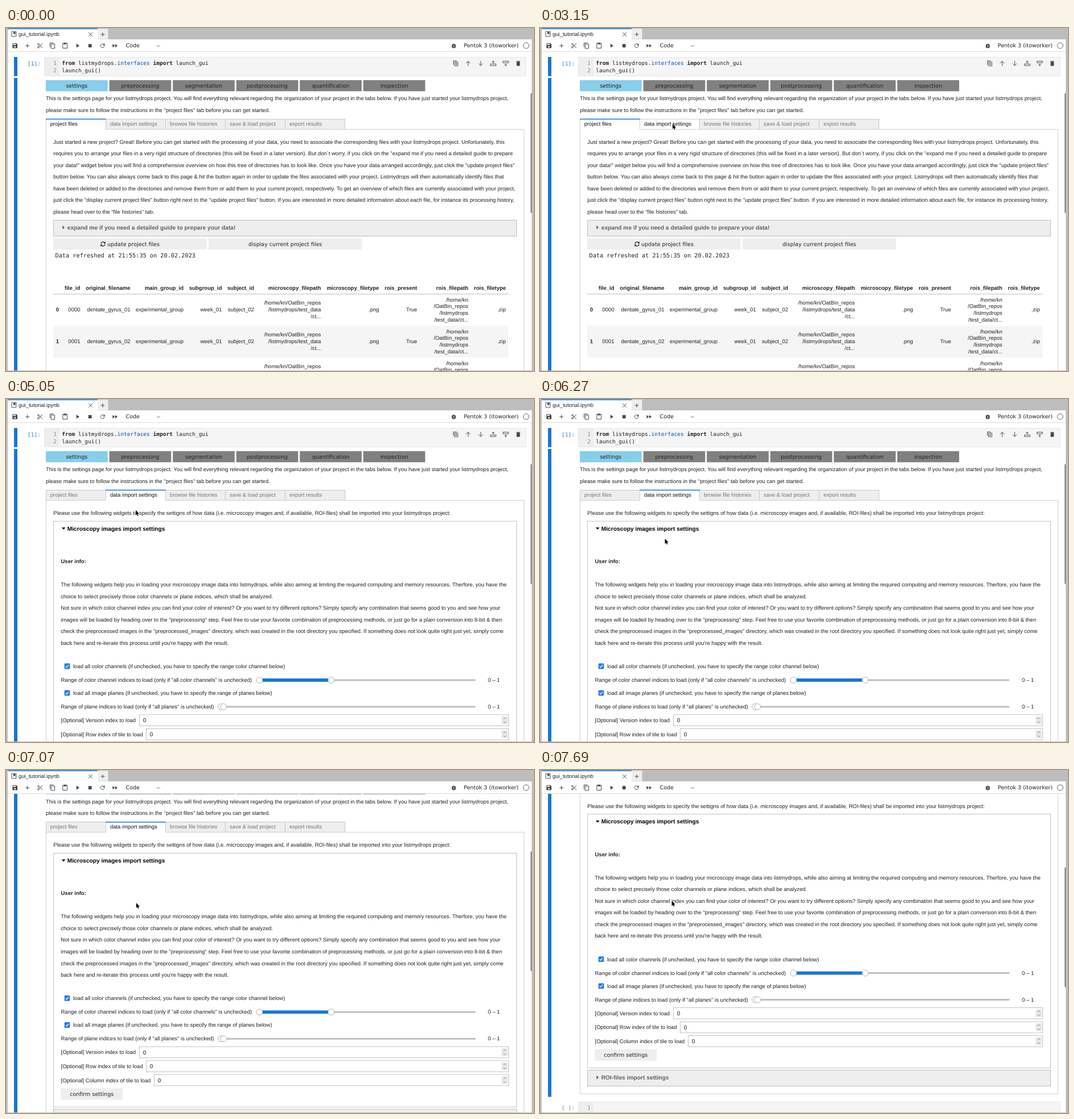
Animation of 928 by 604 pixels, one loop 8000 ms. Source, as an HTML page with a canvas:

```html
<!DOCTYPE html>
<html lang="en">
<head>
<meta charset="utf-8">
<title>Notebook settings</title>
<style>
html, body { margin: 0; width: 100%; height: 100%; overflow: hidden; background: #bdbdbd; }
canvas { display: block; width: 928px; height: 604px; }
</style>
</head>
<body>
<canvas id="stage"></canvas>
<script>
const W = 928, H = 604, LOOP = 8000;
const canvas = document.getElementById('stage');
const ctx = canvas.getContext('2d');
const dpr = window.devicePixelRatio || 1;
canvas.width = W * dpr;
canvas.height = H * dpr;

const SMALL = 9.507, LARGE = 10.24, HAIR = .73;
const SANS = '"Liberation Sans", Arial, sans-serif';
const UI = '"DejaVu Sans", sans-serif';
const MONO = '"DejaVu Sans Mono", monospace';
const INK = '#212121', BLUE = '#1976d2', LINE = '#bdbdbd', EDGE = '#ababab', PALE = '#eeeeee', ICON = '#484848';

// ---------- drawing helpers ----------
function box(x, y, w, h, fill, stroke) {
  if (fill) { ctx.fillStyle = fill; ctx.fillRect(x, y, w, h); }
  if (stroke) {
    ctx.strokeStyle = stroke;
    ctx.lineWidth = HAIR;
    ctx.strokeRect(x + HAIR / 2, y + HAIR / 2, w - HAIR, h - HAIR);
  }
}

// y is the middle of the capitals
function text(str, x, y, { size = SMALL, family = SANS, weight = 400, color = INK, align = 'left' } = {}) {
  ctx.font = `${weight} ${size}px ${family}`;
  ctx.fillStyle = color;
  ctx.textAlign = align;
  ctx.fillText(str, x, y + size * .358);
}

const bold = (str, x, y, opt) => text(str, x, y, { weight: 700, ...opt });

function lines(list, x, y, step, opt) {
  list.forEach((str, i) => text(str, x, y + i * step, opt));
}

// 24-unit glyph centred on x, y
function icon(x, y, { fill, line, width = 2 }, color = ICON, scale = .4875) {
  ctx.save();
  ctx.translate(x - 12 * scale, y - 12 * scale);
  ctx.scale(scale, scale);
  if (fill) { ctx.fillStyle = color; ctx.fill(new Path2D(fill), 'evenodd'); }
  if (line) { ctx.strokeStyle = color; ctx.lineWidth = width; ctx.stroke(new Path2D(line)); }
  ctx.restore();
}

function disc(x, y, r, fill, stroke) {
  ctx.beginPath();
  ctx.arc(x, y, r, 0, Math.PI * 2);
  if (fill) { ctx.fillStyle = fill; ctx.fill(); }
  ctx.strokeStyle = stroke;
  ctx.lineWidth = 1;
  ctx.stroke();
}

const G = {
  book: { fill: 'M10 5h7v9l-3.5-3-3.5 3z', line: 'M4 3h16v18H4z' },
  close: { line: 'M5 5l14 14M19 5L5 19' },
  save: { fill: 'M17 3H5a2 2 0 0 0-2 2v14a2 2 0 0 0 2 2h14a2 2 0 0 0 2-2V7zM12 19a3 3 0 1 1 0-6 3 3 0 0 1 0 6zM15 9H5V5h10z' },
  plus: { fill: 'M19 13h-6v6h-2v-6H5v-2h6V5h2v6h6z' },
  cut: { line: 'M8.5 8.5L21 20M8.5 15.5L21 4M9 6.5a2.8 2.8 0 1 1-5.6 0 2.8 2.8 0 0 1 5.6 0M9 17.5a2.8 2.8 0 1 1-5.6 0 2.8 2.8 0 0 1 5.6 0' },
  copy: { fill: 'M16 1H4a2 2 0 0 0-2 2v14h2V3h12zM19 5H8a2 2 0 0 0-2 2v14a2 2 0 0 0 2 2h11a2 2 0 0 0 2-2V7a2 2 0 0 0-2-2zm0 16H8V7h11z' },
  paste: { fill: 'M19 2h-4.2a3 3 0 0 0-5.6 0H5a2 2 0 0 0-2 2v16a2 2 0 0 0 2 2h14a2 2 0 0 0 2-2V4a2 2 0 0 0-2-2zM19 20H5V4h2v3h10V4h2z' },
  play: { fill: 'M8 5v14l11-7z' },
  stop: { fill: 'M6 6h12v12H6z' },
  redo: { fill: 'M20 3.5v7.5h-7.5z', line: 'M17.5 7.5A7 7 0 1 0 19 13' },
  skip: { fill: 'M3 18l8.5-6L3 6zM12.5 6v12l8.5-6z' },
  chevron: { line: 'M5 9l7 7 7-7' },
  rise: { line: 'M5 15l7-7 7 7' },
  bug: { fill: 'M20 8h-2.8a6 6 0 0 0-10.4 0H4v2h2v2H4v2h2v2H4v2h2.8a6 6 0 0 0 10.4 0H20v-2h-2v-2h2v-2h-2v-2h2zM14 16h-4v-2h4zM14 12h-4v-2h4z' },
  dup: { line: 'M4 17V3h12M8 7h12v14H8zM14 10.5v7M10.5 14h7' },
  up: { line: 'M12 21V4M4 12l8-8 8 8' },
  down: { line: 'M12 3v17M4 12l8 8 8-8' },
  above: { line: 'M2 14h20v6H2zM12 2v9M7.5 6.5h9' },
  below: { line: 'M2 4h20v6H2zM12 13v9M7.5 17.5h9' },
  trash: { fill: 'M6 19a2 2 0 0 0 2 2h8a2 2 0 0 0 2-2V7H6zM19 4h-3.5l-1-1h-5l-1 1H5v2h14z' },
  sync: { fill: 'M22 2v8h-8zM2 22v-8h8z', line: 'M4 11a8 8 0 0 1 14.5-4M20 13a8 8 0 0 1-14.5 4', width: 3 },
  right: { fill: 'M8 4v16l9-8z' },
  drop: { fill: 'M4 8h16l-8 9z' },
  tick: { line: 'M5 12.5l5 5 9-11', width: 3.2 }
};

// ---------- window frame ----------
function frame() {
  box(0, 0, W, 42, LINE);
  box(3, 1, 158, 19, '#fff');
  box(3, .6, 158, 1.5, BLUE);
  icon(14, 10.5, G.book);
  text('gui_tutorial.ipynb', 22, 10.5);
  icon(148.6, 11.3, G.close);
  box(161, 1.3, 18.5, 18.4, PALE);
  icon(170, 11.3, G.plus);

  box(3, 20, 921, 22, '#fff');
  box(3, 41, 921, 1, '#dcdcdc');
  ['save', 'plus', 'cut', 'copy', 'paste', 'play', 'stop', 'redo', 'skip']
    .forEach((name, i) => icon(15.7 + i * 22, 31.2, G[name]));
  text('Code', 210.5, 31, { family: UI });
  icon(268, 31.3, G.chevron, ICON, .4);
  icon(787, 31.2, G.bug);
  text('Pentok 3 (itoworker)', 804.5, 31, { family: UI });
  disc(914.3, 31, 5, null, '#616161');

  box(0, 20, 3, H, LINE);
  box(924, 0, 4, H, LINE);
  box(0, 603, W, 1, LINE);
}

function editor(y, h) {
  box(67.3, y, 847, h, '#f5f5f5', '#e0e0e0');
  box(68, y + HAIR, 26, h - 2 * HAIR, '#eeeeee');
}

const code = { family: MONO };
const lineNo = { family: MONO, color: '#8a8a8a' };

function codeCell() {
  box(14, 51, 6, 33.8, BLUE);
  editor(51.2, 33.4);
  text('[1]:', 38, 62.5, { family: MONO, color: '#307fc1' });
  text('1', 83.2, 61.7, lineNo);
  text('2', 83.2, 74.2, lineNo);
  const at = n => 98.3 + n * SMALL * .602;
  bold('from', at(0), 61.7, code);
  text('listmydrops.', at(5), 61.7, code);
  text('interfaces', at(17), 61.7, { family: MONO, color: '#0055aa' });
  bold('import', at(28), 61.7, code);
  text('launch_gui', at(35), 61.7, code);
  text('launch_gui()', at(0), 74.2, code);
  ['dup', 'up', 'down', 'above', 'below', 'trash']
    .forEach((name, i) => icon(790.3 + i * 22, 62.3, G[name]));
}

function button(label, x, y, w, h, fill = PALE) {
  box(x, y, w, h, fill);
  text(label, x + w / 2, y + h / 2, { family: UI, align: 'center' });
}

// ---------- output area ----------
const TABS = ['project files', 'data import settings', 'browse file histories', 'save & load project', 'export results'];
const TAB_W = 105.1, TAB_Y = 160;

function header(active, hover) {
  ['settings', 'preprocessing', 'segmentation', 'postprocessing', 'quantification', 'inspection']
    .forEach((label, i) => button(label, 70 + i * 111.6, 91.8, 108.7, 19.6, i ? '#808080' : '#87ceeb'));
  lines([
    'This is the settings page for your listmydrops project. You will find everything relevant regarding the organization of your project in the tabs below. If you have just started your listmydrops project,',
    'please make sure to follow the instructions in the "project files" tab before you can get started.'
  ], 70, 124, 20.5);

  TABS.forEach((label, i) => {
    const x = 70 + i * TAB_W, on = i === active;
    box(x, TAB_Y, TAB_W + HAIR, 18.8, on || i === hover ? '#fff' : PALE, LINE);
    text(label, x + 7.8, 168.7, { color: on || i === hover ? '#111' : '#757575' });
  });
}

function panel(bottom, active) {
  box(70, 178, 840.6, bottom - 178, '#fff', LINE);
  const x = 70 + active * TAB_W;
  box(x + HAIR, 177, TAB_W - HAIR, 2.5, '#fff');
  box(x, 159.7, TAB_W + HAIR, 1.5, BLUE);
}

function fold(label, y) {
  box(83.2, y, 814.6, 29, PALE, EDGE);
  icon(101, y + 13.2, G.right, '#616161', .42);
  bold(label, 107.7, y + 13.6, { size: LARGE, color: '#616161' });
}

const COLS = [
  ['file_id', 130.5], ['original_filename', 218.5], ['main_group_id', 312], ['subgroup_id', 379.5],
  ['subject_id', 436], ['microscopy_filepath', 553.5], ['microscopy_filetype', 655.5],
  ['rois_present', 722.5], ['rois_filepath', 812.5], ['rois_filetype', 878.5]
];

function table() {
  const end = { align: 'right' };
  COLS.forEach(([name, x]) => bold(name, x, 457.3, end));
  box(83, 468, 800, 1, LINE);
  for (let r = 0; r < 3; r++) {
    const y = 495.7 + r * 56;
    if (r % 2) box(83, y - 27.5, 800, 56, '#f5f5f5');
    bold(r, 93, y, end);
    const cells = [
      '000' + r, 'dentate_gyrus_0' + (r + 1), 'experimental_group', 'week_01', 'subject_02',
      ['/home/kn/OatBin_repos', '/listmydrops/test_data', '/ct...'], '.png', 'True',
      ['/home/kn', '/OatBin_repos', '/listmydrops', '/test_data/ct...'], '.zip'
    ];
    cells.forEach((cell, i) => {
      const list = [].concat(cell);
      lines(list, COLS[i][1], y - (list.length - 1) * 5.85, 11.7, end);
    });
  }
}

function filesPage() {
  panel(900, 0);
  lines([
    'Just started a new project? Great! Before you can get started with the processing of your data, you need to associate the corresponding files with your listmydrops project. Unfortunately, this',
    'requires you to arrange your files in a very rigid structure of directories (this will be fixed in a later version). But don\u00b4t worry, if you click on the "expand me if you need a detailed guide to prepare',
    'your data!" widget below you will find a comprehensive overview on how this tree of directories has to look like. Once you have your data arranged accordingly, just click the "update project files"',
    'button below. You can also always come back to this page & hit the button again in order to update the files associated with your project. Listmydrops will then automatically identify files that',
    'have been deleted or added to the directories and remove them from or add them to your current project, respectively. To get an overview of which files are currently associated with your project,',
    'just click the "display current project files" button right next to the "update project files" button. If you are interested in more detailed information about each file, for instance its processing history,',
    'please head over to the "file histories" tab.'
  ], 83.3, 200.5, 20.5);
  fold('expand me if you need a detailed guide to prepare your data!', 338);
  box(83, 370.5, 269.5, 19.7, PALE);
  icon(170.5, 380.4, G.sync, INK, .44);
  text('update project files', 178, 380.4, { family: UI });
  button('display current project files', 356, 370.5, 269.6, 19.7);
  text('Data refreshed at 21:55:35 on 20.02.2023', 86.5, 400.5, { family: MONO, size: LARGE });
  table();
}

function check(label, y) {
  ctx.beginPath();
  ctx.roundRect(102.6, y - 4.9, 9.8, 9.8, 1.5);
  ctx.fillStyle = '#2b7ce0';
  ctx.fill();
  icon(107.5, y, G.tick, '#fff', .38);
  text(label, 118, y);
}

function slider(label, y, from, to, knobs) {
  const mid = y + .5;
  text(label, 96.5, y);
  box(from, mid - 1.45, 825 - from, 2.9, LINE);
  box(from, mid - 2.9, to - from, 5.8, BLUE);
  knobs.forEach(x => disc(x, mid, 5.4, '#fff', '#b0b0b0'));
  text('0 \u2013 1', 847, y);
}

function field(label, y, x) {
  text(label, 96.5, y);
  box(x, y - 10.2, 884 - x, 20.4, '#fff', EDGE);
  text('0', x + 6.5, y + .3, { family: UI });
  box(871, y - 7, 11, 14, '#e8e8e8');
  icon(876.7, y - 3.3, G.rise, '#444', .32);
  icon(876.7, y + 3.3, G.chevron, '#444', .32);
}

function importPage() {
  panel(708, 1);
  text('Please use the following widgets to specify the settigns of how data (i.e. microscopy images and, if available, ROI-files) shall be imported into your listmydrops project:', 83.3, 200.5);
  box(83.2, 214.8, 814.6, 447.8, '#fff', EDGE);
  icon(101.2, 228, G.drop, '#000', .42);
  bold('Microscopy images import settings', 107.7, 228.2, { size: LARGE, color: '#000' });
  bold('User info:', 96.5, 285.7);
  lines([
    'The following widgets help you in loading your microscopy image data into listmydrops, while also aiming at limiting the required computing and memory resources. Therfore, you have the',
    'choice to select precisely those color channels or plane indices, which shall be analyzed.',
    'Not sure in which color channel index you can find your color of interest? Or you want to try different options? Simply specify any combination that seems good to you and see how your',
    'images will be loaded by heading over to the "preprocessing" step. Feel free to use your favorite combination of preprocessing methods, or just go for a plain conversion into 8-bit & then',
    'check the preprocessed images in the "preprocessed_images" directory, which was created in the root directory you specified. If something does not look quite right just yet, simply come',
    'back here and re-iterate this process until you\'re happy with the result.'
  ], 96.3, 326.7, 20.53);
  check('load all color channels (if unchecked, you have to specify the range color channel below)', 470.5);
  slider('Range of color channel indices to load (only if "all color channels" is unchecked)', 494.5, 445, 571.5, [445.5, 571.5]);
  check('load all image planes (if unchecked, you have to specify the range of planes below)', 517.7);
  slider('Range of plane indices to load (only if "all planes" is unchecked)', 541.5, 379, 382, [378, 382.5]);
  field('[Optional] Version index to load', 565.7, 234);
  field('[Optional] Row index of tile to load', 590.4, 246);
  field('[Optional] Column index of tile to load', 614.8, 260);
  button('confirm settings', 96.3, 629, 108.7, 20.3);
  fold('ROI-files import settings', 665.5);

  editor(721.7, 40);
  text('[ ]:', 38, 732, { family: MONO, color: '#8a8a8a' });
  text('1', 83.2, 732, lineNo);
}

// ---------- motion ----------
// progress counts up in equal ticks, the first one already at the start time
function ticks(t, start, end, n) {
  if (t < start) return 0;
  const tick = n > 1 ? (end - start) / (n - 1) : 1;
  return Math.min(n, Math.floor((t - start) / tick + 1e-6) + 1) / n;
}

const easeOut = (p, k) => 1 - Math.pow(1 - p, k);

// start, end, ticks, ease, then three points of a curve
const MOVES = [
  [1810, 2510, 8, 1, [330, -18], [270, 100], [238, 215]],
  [2630, 3150, 6, 1.5, [238, 215], [238, 190], [233, 168.8]],
  [5050, 5770, 8, 2.36, [233, 168.8], [238, 225], [137.6, 234]],
  [5870, 5870, 1, 1, [137.6, 234], [137, 234], [136.3, 234]],
  [6070, 6270, 3, 1.3, [136.3, 234], [175, 240], [219.6, 246]],
  [6970, 7170, 3, 1.3, [219.6, 246], [226, 238], [231.6, 230.3]]
];

function pointer(t) {
  const move = MOVES.filter(m => t >= m[0]).pop();
  if (!move) return null;
  const [start, end, n, k, a, b, c] = move;
  const u = easeOut(ticks(t, start, end, n), k), v = 1 - u;
  return [0, 1].map(i => v * v * a[i] + 2 * u * v * b[i] + u * u * c[i]);
}

function scrollAt(t) {
  const first = Math.pow(ticks(t, 6570, 6770, 3), 1.25);
  const second = easeOut(ticks(t, 7490, 7690, 3), 1.57);
  return 68.7 * (first + second);
}

function thumbAlpha(t) {
  if (t < 300) return 1;
  if (t < 520) return .5;
  return t < 1810 ? 0 : 1;
}

const arrow = new Path2D('M0 0V9L2 7.2L3.4 10.2L4.8 9.6L3.5 6.6H6.2Z');

function drawPointer([x, y]) {
  ctx.save();
  ctx.translate(x, y);
  ctx.strokeStyle = '#fff';
  ctx.lineWidth = 1;
  ctx.stroke(arrow);
  ctx.fillStyle = '#000';
  ctx.fill(arrow);
  ctx.restore();
}

function draw(t) {
  const pos = pointer(t), scroll = scrollAt(t), active = t < 4050 ? 0 : 1;
  let hover = -1;
  if (pos && pos[1] + scroll > TAB_Y && pos[1] + scroll < 178) hover = Math.floor((pos[0] - 70) / TAB_W);

  ctx.setTransform(dpr, 0, 0, dpr, 0, 0);
  ctx.textRendering = 'geometricPrecision';
  box(0, 0, W, H, '#fff');

  ctx.save();
  ctx.beginPath();
  ctx.rect(3, 42, 921, 561);
  ctx.clip();
  ctx.translate(0, -scroll);
  codeCell();
  box(14, 88, 6, active ? 625 : 700, BLUE);
  header(active, hover);
  active ? importPage() : filesPage();
  ctx.restore();

  frame();
  ctx.globalAlpha = thumbAlpha(t);
  box(922, 115 + scroll * .413, 2, 210.5, '#858585');
  ctx.globalAlpha = 1;
  if (pos) drawPointer(pos);
}

function loop() {
  draw(performance.now() % LOOP);
  requestAnimationFrame(loop);
}
loop();
</script>
</body>
</html>
```
